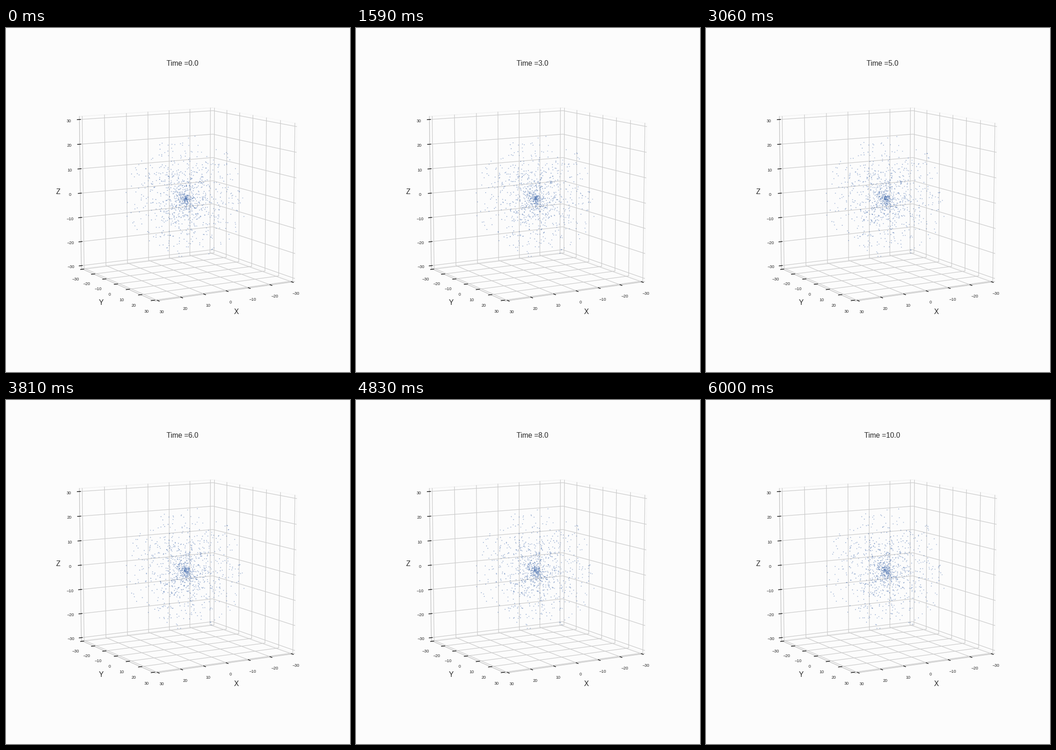
These frames come from a looping animation (748 by 748 pixels, 6.03 s). A matplotlib script:

```python
import numpy as np
import matplotlib.pyplot as plt
from matplotlib.animation import FuncAnimation
from matplotlib.collections import LineCollection

SIZE, DPI = 748, 93.5
FRAMES, DT = 201, 0.05
L = 31.25                                # half width of the padded box
TICKS = range(-30, 31, 10)
BG, INK, GRID = "#fcfcfc", "0.15", "0.8"
BLUE = (0.298, 0.447, 0.690)

plt.rcParams["font.family"] = "Liberation Sans"

# Perspective camera
ELEV, AZIM = np.radians([10, 60])
DIST = 10
UNIT = 1.8294640721620434 / np.sqrt(3) / 60
SIDE = 0.77 * SIZE
SCALE = SIDE / 0.185
CX = 0.5125 * SIZE + SIDE * (0.95 / 1.85 - 0.5)
CY = 0.89 * SIZE - SIDE * 0.95 / 1.85


def project(points):
    """Map 3D data to stage pixels; also return the depth towards the viewer."""
    x, y, z = np.asarray(points, float).T * UNIT
    flat = np.cos(AZIM) * x + np.sin(AZIM) * y
    right = -np.sin(AZIM) * x + np.cos(AZIM) * y
    up = np.cos(ELEV) * z - np.sin(ELEV) * flat
    depth = np.cos(ELEV) * flat + np.sin(ELEV) * z
    k = SCALE / (DIST - depth)
    return np.column_stack([CX + right * k, CY - up * k]), depth


def simulate(n=1000, radius=25, speed=0.15, soft=1.0, seed=1):
    """Leapfrog orbits in a softened halo with a flat rotation curve."""
    rng = np.random.default_rng(seed)

    def unit(v):
        return v / np.linalg.norm(v, axis=1, keepdims=True)

    def pull(p):
        return -speed**2 * p / ((p**2).sum(1, keepdims=True) + soft**2)

    heading = unit(rng.normal(size=(n, 3)))
    pos = heading * np.linspace(0, radius, n)[:, None]
    vel = unit(np.cross(heading, rng.normal(size=(n, 3))))
    vel *= speed * rng.uniform(0.4, 1.4, (n, 1))
    path = [pos]
    for _ in range(FRAMES - 1):
        vel = vel + pull(pos) * DT / 2
        pos = pos + vel * DT
        vel = vel + pull(pos) * DT / 2
        path.append(pos)
    return path


fig = plt.figure(figsize=(SIZE / DPI, SIZE / DPI), dpi=DPI, facecolor=BG)
ax = fig.add_axes([0, 0, 1, 1])
ax.set(xlim=(0, SIZE), ylim=(SIZE, 0))
ax.axis("off")


def draw_lines(lines, color, width, z, cap="round"):
    ax.add_collection(LineCollection([project(p)[0] for p in lines], colors=color,
                                     linewidths=width, capstyle=cap, zorder=z))


def label(x, y, s, size):
    return ax.text(x, y, s, size=size, color=INK, ha="center", va="center", zorder=5)


# Pane outlines, open at the last edge
back, left, front, side = (-L, -L, -L), (L, -L, -L), (L, L, -L), (-L, L, -L)
draw_lines([[back, side, (-L, L, L), (-L, -L, L)]], (0.95, 0.95, 0.95, 0.5), 1, 1)
draw_lines([[back, left, (L, -L, L), (-L, -L, L)]], (0.9, 0.9, 0.9, 0.5), 1, 1)
draw_lines([[back, left, front, side]], (0.925, 0.925, 0.925, 0.5), 1, 1)

# Grid lines fold over the two panes they cross
grid = []
for t in TICKS:
    grid += [[(t, -L, L), (t, -L, -L), (t, L, -L)],
             [(-L, t, L), (-L, t, -L), (L, t, -L)],
             [(L, -L, t), (-L, -L, t), (-L, L, t)]]
draw_lines(grid, GRID, 1, 2)
draw_lines([[front, side], [left, front], [left, (L, -L, L)]], GRID, 1.25, 2)

# Ticks reach further out than in
OUT, IN = L + 1.0, L - 0.5
ticks = []
for t in TICKS:
    ticks += [[(t, OUT, -L), (t, IN, -L)],
              [(OUT, t, -L), (IN, t, -L)],
              [(OUT, -L, t), (IN, -L, t)]]
draw_lines(ticks, INK, 1.25, 3)

for t in TICKS:
    spots = project([(t, L, -L), (L, t, -L), (L, -L, t)])[0]
    shifts = [(8.5, 25), (-15, 22.7 + t / 25), (-22.6, 3.2)]
    for (x, y), (dx, dy) in zip(spots, shifts):
        label(x + dx, y + dy, str(t).replace("-", "\u2212"), 7)

for x, y, s in [(500.5, 617.3, "X"), (207, 597.6, "Y"), (113, 356.6, "Z")]:
    label(x, y, s, 12)

title = ax.text(0.5125 * SIZE, 0.12 * SIZE - 6 * DPI / 72, "", size=12,
                color=INK, ha="center", va="baseline")

path = simulate()
dots = ax.scatter(*project(path[0])[0].T, s=(2.1 * 72 / DPI)**2, linewidths=0, zorder=4)


def update(i):
    xy, depth = project(path[i])
    near = (depth - depth.min()) / np.ptp(depth)
    dots.set_offsets(xy)
    dots.set_facecolor([(*BLUE, a) for a in 0.35 + 0.25 * near])
    title.set_text(f"Time ={round(i * DT):.1f}")
    return dots, title


anim = FuncAnimation(fig, update, frames=FRAMES, interval=30, repeat=True, repeat_delay=0)
plt.show()
```
